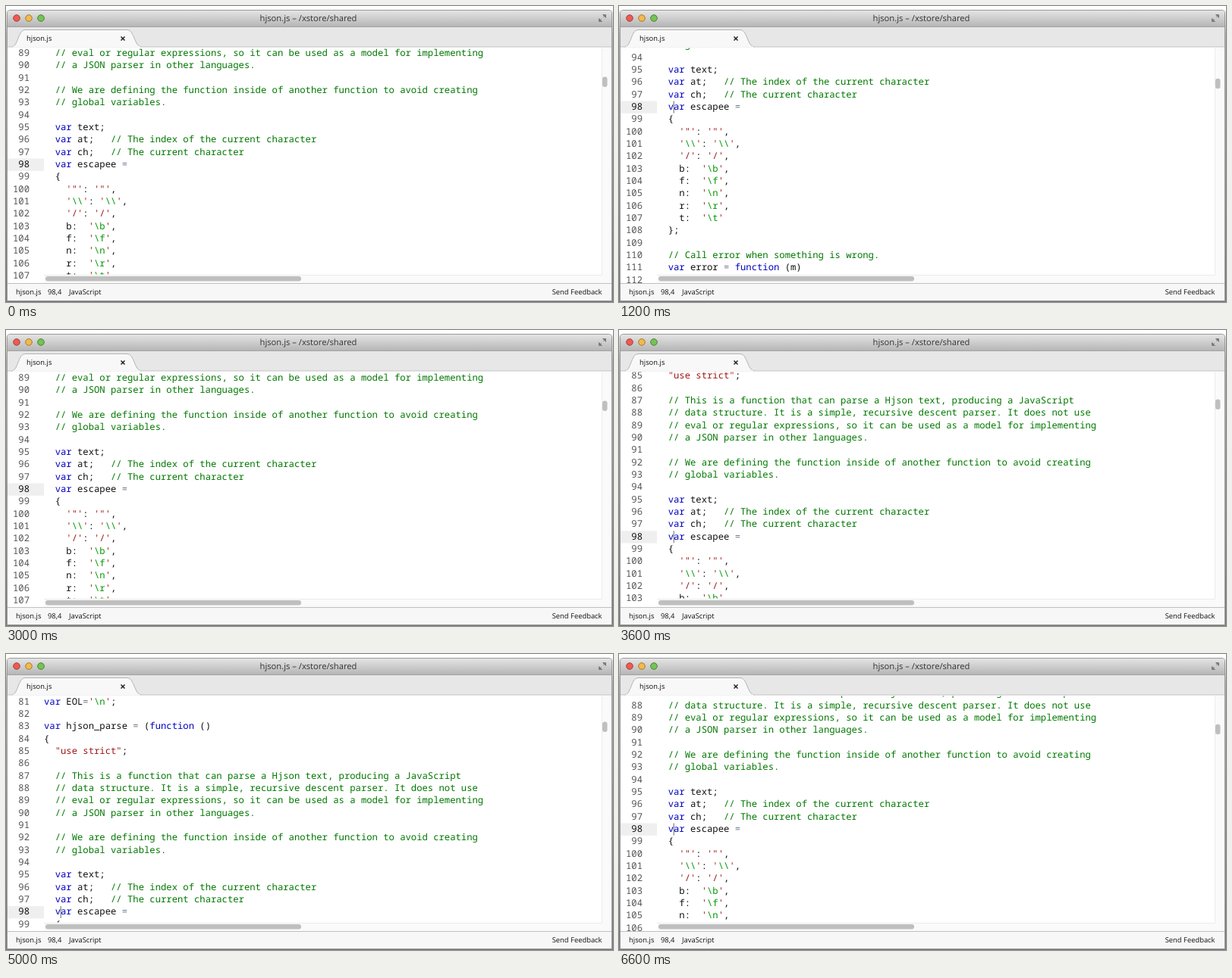
An HTML page that plays this animation: 800 by 391 pixels, repeating every 6.8 s.

```html
<!DOCTYPE html>
<html lang="en">
<head>
<meta charset="utf-8">
<title>Scrolling code editor</title>
<style>
  html, body { margin: 0; width: 100%; height: 100%; overflow: hidden; background: #fff; }
  svg { display: block; width: 100%; height: 100%; }
  text { white-space: pre; text-rendering: geometricPrecision; }
  .ui { font: 9.4px "Open Sans", sans-serif; fill: #111; }
  .ui .title { font-size: 11.2px; fill: #333; }
  .code { font: 500 12.23px "Noto Sans Mono", monospace; fill: #111; }
  .comment { fill: #007800; }
  .keyword { fill: #0000c0; }
  .string { fill: #a31515; }
  .escape { fill: #009a00; }
  .operator { fill: #687687; }
  .number { fill: #555; text-anchor: end; }
  .active { fill: #111; }
</style>
</head>
<body>
<svg viewBox="0 0 800 391">
  <defs>
    <linearGradient id="titleBar" x2="0" y2="1">
      <stop stop-color="#e4e4e4"/><stop offset="1" stop-color="#b6b6b6"/>
    </linearGradient>
    <linearGradient id="shadow" x2="0" y2="1">
      <stop stop-color="#fff"/><stop offset=".1" stop-color="#b0b0b0"/><stop offset="1" stop-color="#777"/>
    </linearGradient>
    <clipPath id="gutterClip"><rect x="2" y="55.5" width="48" height="310.5"/></clipPath>
    <clipPath id="codeClip"><rect x="50" y="55.5" width="735" height="299"/></clipPath>
  </defs>

  <rect width="800" height="391" fill="url(#shadow)"/>
  <rect width="800" height="5" fill="#fff"/>
  <path d="M1.5 389.5V10q0-4.5 4.5-4.5H794q4.5 0 4.5 4.5V389.5z" fill="#fff" stroke="#999"/>
  <path d="M2 27V10q0-4 4-4H794q4 0 4 4V27z" fill="url(#titleBar)"/>
  <rect x="2" y="27" width="796" height="27" fill="#e7e7e7"/>
  <path d="M2 27.5H798" stroke="#a2a2a2"/>
  <path d="M2 54H798" stroke="#c4c4c4"/>
  <path d="M8 54C16 53 16 31.5 25 31.5H160C169 31.5 169 53 178 54" fill="#f8f8f8" stroke="#b4b4b4"/>
  <path d="M9 54H177" stroke="#f8f8f8" stroke-width="1.5"/>

  <g stroke-width="1">
    <circle cx="14" cy="16" r="4.3" fill="#ee5a52" stroke="#a2433d"/>
    <circle cx="30" cy="16" r="4.3" fill="#f3b94c" stroke="#a27a33"/>
    <circle cx="46" cy="16" r="4.3" fill="#74c455" stroke="#4d8038"/>
  </g>
  <path d="M786.5 11.5h4v4zM781.5 16.5v4h4zM787 15l3-3M782 20l3-3" fill="#777" stroke="#777" stroke-width=".8"/>
  <path d="M151.5 40.5l5 5m0-5l-5 5" stroke="#222" stroke-width="1.5"/>

  <g clip-path="url(#gutterClip)"><g id="gutter" class="code"></g></g>
  <g clip-path="url(#codeClip)"><g id="code" class="code"></g></g>

  <path d="M785 55H798V366H50V355H785z" fill="#fafafa"/>
  <path d="M785.5 55V355.5H50" fill="none" stroke="#ececec"/>
  <rect x="52" y="357" width="337" height="6.5" rx="3.25" fill="#bfbfbf"/>
  <rect id="thumb" x="786" width="6.5" height="13.5" rx="3.25" fill="#bfbfbf"/>

  <rect x="2" y="366" width="796" height="23" fill="#f7f7f7"/>
  <path d="M2 366.5H798" stroke="#c0c0c0"/>

  <g class="ui">
    <text class="title" x="398.5" y="20.3" text-anchor="middle">hjson.js – /xstore/shared</text>
    <text x="27" y="46">hjson.js</text>
    <text x="13" y="380.5">hjson.js</text>
    <text x="55" y="380.5">98,4</text>
    <text x="83" y="380.5">JavaScript</text>
    <text x="785.5" y="380.5" text-anchor="end">Send Feedback</text>
  </g>
</svg>

<script>
const LOOP = 6800, STEP = 200;
const FIRST_LINE = 79, ACTIVE_LINE = 98;
const LINE_HEIGHT = 16.335, LEFT = 50;

const source = String.raw`

var EOL='\n';

var hjson_parse = (function ()
{
  "use strict";

  // This is a function that can parse a Hjson text, producing a JavaScript
  // data structure. It is a simple, recursive descent parser. It does not use
  // eval or regular expressions, so it can be used as a model for implementing
  // a JSON parser in other languages.

  // We are defining the function inside of another function to avoid creating
  // global variables.

  var text;
  var at;   // The index of the current character
  var ch;   // The current character
  var escapee =
  {
    '"': '"',
    '\\': '\\',
    '/': '/',
    b:  '\b',
    f:  '\f',
    n:  '\n',
    r:  '\r',
    t:  '\t'
  };

  // Call error when something is wrong.
  var error = function (m)
  {
    var i, col=0, line=1;`;

const escapeHtml = s => s.replace(/&/g, "&amp;").replace(/</g, "&lt;");
const span = (kind, s) => `<tspan class="${kind}">${s}</tspan>`;

function highlight(line) {
  const token = /(\/\/.*)|('(?:\\.|[^'\\])*'|"[^"]*")|\b(var|function)\b|(=)/g;
  return escapeHtml(line).replace(token, (all, comment, string, keyword) =>
    comment ? span("comment", all) :
    string ? span("string", all.replace(/\\./g, s => span("escape", s))) :
    keyword ? span("keyword", all) : span("operator", all));
}

// Rows are placed relative to the centre of the active line.
const gutter = document.getElementById("gutter");
const code = document.getElementById("code");
const thumb = document.getElementById("thumb");

let numbers = `<rect x="2" y="-8" width="48" height="16.3" fill="#efefef"/>`;
let rows = "";
source.split("\n").forEach((line, i) => {
  const number = FIRST_LINE + i;
  const y = (number - ACTIVE_LINE) * LINE_HEIGHT + 3.4;
  const kind = number === ACTIVE_LINE ? "number active" : "number";
  numbers += `<text class="${kind}" x="31" y="${y}">${number}</text>`;
  rows += `<text x="${LEFT}" y="${y}">${highlight(line)}</text>`;
});
gutter.innerHTML = numbers;
code.innerHTML = rows + `<rect id="cursor" x="71.7" y="-8" width="1" height="16" fill="#666"/>`;
const cursor = document.getElementById("cursor");

// Time and height of the active line, joined by monotone curves.
const path = [
  [0, 209.5], [400, 209.5], [600, 204], [1200, 133.5], [1600, 108], [2000, 108],
  [3000, 210.5], [4000, 308], [4700, 345.5], [5000, 341], [5800, 280], [6600, 231.5], [6800, 209.5]
];
const slope = i => (path[i + 1][1] - path[i][1]) / (path[i + 1][0] - path[i][0]);

function tangent(i) {
  if (i === 0 || i === path.length - 1) return 0;
  const a = slope(i - 1), b = slope(i);
  return a * b > 0 ? 2 * a * b / (a + b) : 0;
}

function activeLineY(t) {
  const i = path.findIndex((p, k) => t < path[k + 1][0]);
  const [t0, y0] = path[i], [t1, y1] = path[i + 1];
  const length = t1 - t0, u = (t - t0) / length, v = 1 - u;
  return v * v * (1 + 2 * u) * y0 + u * u * (3 - 2 * u) * y1
    + length * u * v * (v * tangent(i) - u * tangent(i + 1));
}

function draw(now) {
  const t = Math.floor(now % LOOP / STEP) * STEP;
  const y = activeLineY(t);
  const shift = `translate(0 ${y.toFixed(2)})`;
  gutter.setAttribute("transform", shift);
  code.setAttribute("transform", shift);
  thumb.setAttribute("y", 93.5 - (y - 209.5) / 33);
  const phase = t % 800;
  cursor.setAttribute("visibility", phase === 200 || phase === 400 ? "visible" : "hidden");
}

const start = performance.now();
function tick() {
  draw(performance.now() - start);
  requestAnimationFrame(tick);
}
tick();
</script>
</body>
</html>
```
